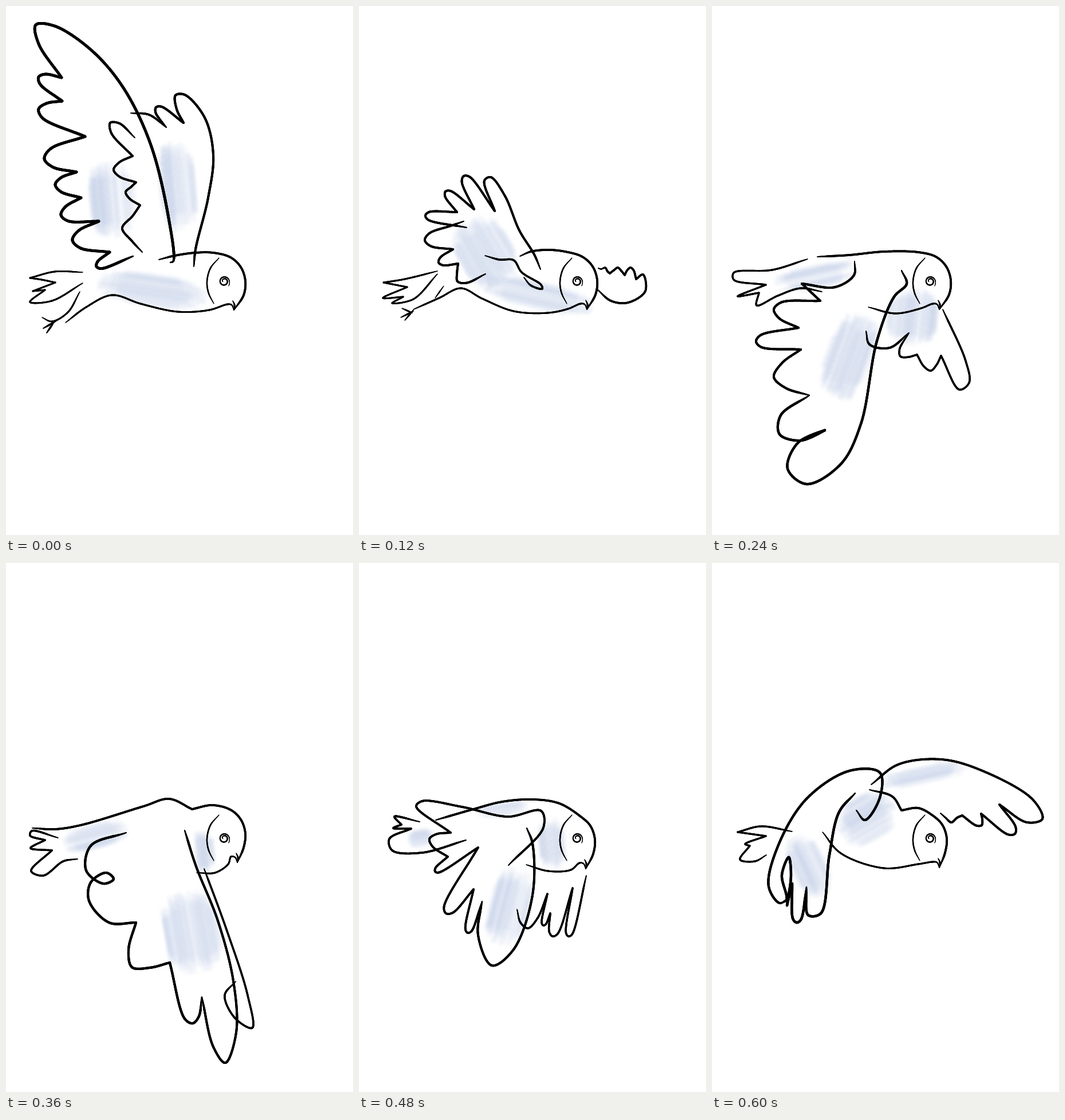
Write an HTML page with a canvas that moves like this. It is 606 by 924 pixels and loops after 720 ms.

```html
<!DOCTYPE html>
<html lang="en">
<head>
<meta charset="utf-8">
<title>Bird in flight</title>
<style>
  html, body { margin: 0; width: 100%; height: 100%; overflow: hidden; background: #fff; }
  canvas { position: absolute; left: 0; top: 0; width: 606px; height: 924px; opacity: 0; }
</style>
</head>
<body>
<script>
const W = 606, H = 924, HOLD = 120, COUNT = 6;
const dpr = window.devicePixelRatio || 1;
let ctx, seed = 7, index = 0;

const rand = (lo = 0, hi = 1) => lo + (hi - lo) * (seed = (seed * 16807) % 2147483647) / 2147483647;
const parse = s => s.trim().split(/\s+/).map(p => p.split(',').map(Number));
const gap = (a, b) => Math.hypot(a[0] - b[0], a[1] - b[1]);
const mirror = (a, b) => [2 * a[0] - b[0], 2 * a[1] - b[1]];
const mix = (a, b, t0, t1, t) => a.map((v, k) => (v * (t1 - t) + b[k] * (t - t0)) / (t1 - t0));

// Centripetal Catmull-Rom curve, sampled about every pixel
function spline(pts) {
  const n = pts.length, out = [];
  const at = i => i < 0 ? mirror(pts[0], pts[1]) : i >= n ? mirror(pts[n - 1], pts[n - 2]) : pts[i];
  for (let i = 0; i < n - 1; i++) {
    const [a, b, c, d] = [at(i - 1), at(i), at(i + 1), at(i + 2)];
    const t1 = Math.sqrt(gap(a, b)), t2 = t1 + Math.sqrt(gap(b, c)), t3 = t2 + Math.sqrt(gap(c, d));
    const steps = Math.ceil(gap(b, c));
    for (let k = 0; k <= steps; k++) {
      const t = t1 + (t2 - t1) * k / steps;
      const ab = mix(a, b, 0, t1, t), bc = mix(b, c, t1, t2, t), cd = mix(c, d, t2, t3, t);
      out.push(mix(mix(ab, bc, 0, t2, t), mix(bc, cd, t1, t3, t), t1, t2, t));
    }
  }
  return out;
}

// Pen line with thinner ends
function trace(pts, width) {
  const last = pts.length - 1, taper = Math.min(22, last / 2);
  for (let i = 0; i < last; i++) {
    ctx.lineWidth = width * (0.5 + 0.5 * Math.min(1, i / taper, (last - i) / taper));
    ctx.beginPath();
    ctx.moveTo(...pts[i]);
    ctx.lineTo(...pts[i + 1]);
    ctx.stroke();
  }
}

// Rounded feather from one notch to the next; its width follows the notch spacing
function feather(from, tip, to) {
  const mid = mix(from, to, 0, 2, 1), len = gap(mid, tip);
  const ux = (tip[0] - mid[0]) / len, uy = (tip[1] - mid[1]) / len;
  const r = 0.27 * ((from[0] - to[0]) * uy + (to[1] - from[1]) * ux);
  const back = 0.8 * Math.abs(r);
  const side = k => [tip[0] - k * r * uy - back * ux, tip[1] + k * r * ux - back * uy];
  return spline([from, side(-1), tip, side(1), to]);
}

// Smooth line (a slash is a sharp corner), then a row of feathers: tip, notch, tip, notch...
function pen(width, edge, tips) {
  let prev, all = [];
  for (const part of edge.split('/')) {
    const pts = parse(part);
    all = all.concat(spline(prev ? [prev, ...pts] : pts));
    prev = pts[pts.length - 1];
  }
  const row = tips ? parse(tips) : [];
  for (let i = 0; i < row.length; i += 2) {
    all = all.concat(feather(prev, row[i], row[i + 1]));
    prev = row[i + 1];
  }
  trace(all, width);
}

function eye(x, y) {
  const pts = [];
  for (let t = 0; t <= 1; t += 0.01) {
    const a = 0.9 - (1 - t) * 10.5, d = 2 + 6.5 * Math.sqrt(t) + 3 * t ** 12;
    pts.push([x + d * Math.cos(a), y + d * Math.sin(a)]);
  }
  trace(pts, 2.2);
}

// Back, head, beak and belly; the head hangs on the beak tip
function body(right, x, y, back, belly) {
  const shift = (...pts) => pts.map(([dx, dy]) => `${x + dx},${y + dy}`).join(' ');
  const far = right - x;
  pen(3.7, back + ' ' + shift([far - 26, -92], [far - 8, -75], [far, -51], [far - 3, -26], [0, 0]));
  pen(3, belly + ' ' + shift([-11, -10], [-4, -9], [0, 0]));
  pen(3, shift([-2, -16], [1, -9], [0, 0]));
  pen(2.4, '372,440 357,458 351,482 354,502 363,520');
  eye(381, 481);
}

// Soft brush patch: seeded bristles laid side by side along one direction
function wash(x, y, length, width, degrees) {
  ctx.save();
  ctx.translate(x, y);
  ctx.rotate(degrees * Math.PI / 180);
  ctx.lineCap = 'butt';
  ctx.filter = 'blur(2px)';
  ctx.strokeStyle = 'rgba(180,194,219,.075)';
  for (let i = 0; i < width * 1.1; i++) {
    const v = rand(-1, 1), reach = length / 2 * Math.sqrt(1 - 0.8 * v ** 4);
    ctx.lineWidth = rand(4, 13);
    ctx.beginPath();
    ctx.moveTo(-reach * rand(0.6, 1.1), v * width / 2);
    ctx.lineTo(reach * rand(0.6, 1.1), v * width / 2);
    ctx.stroke();
  }
  ctx.restore();
}

// Each pose is one drawing, shown for its share of the loop
function pose(draw) {
  const c = document.body.appendChild(document.createElement('canvas'));
  c.width = W * dpr;
  c.height = H * dpr;
  ctx = c.getContext('2d');
  ctx.scale(dpr, dpr);
  ctx.lineCap = ctx.lineJoin = 'round';
  draw();
  const cut = 1 / COUNT, loop = HOLD * COUNT;
  c.animate([
    { opacity: 1, offset: 0 }, { opacity: 1, offset: cut },
    { opacity: 0, offset: cut }, { opacity: 0, offset: 1 }
  ], { duration: loop, iterations: Infinity, delay: index++ * HOLD - loop });
}

// Wings raised
pose(() => {
  wash(185, 338, 125, 75, 85);
  wash(300, 315, 150, 62, 85);
  wash(255, 497, 180, 52, 8);
  pen(4.8, '287,448 292,446 283,365 252,240 205,143 150,78 85,35 52,33 57,66 97,125',
    '57,124 98,166 57,180 138,228 67,267 123,290 86,312 131,335 96,365 162,376 116,409 181,430 158,455 222,437');
  pen(4, '328,455 331,425 353,335 362,260 347,195 312,155 296,156 298,180 310,204', '262,177 280,212');
  pen(3.6, '280,212 250,190 218,187');
  pen(3.8, '225,230 198,205 182,204 184,222 221,262', '188,286 227,308 209,325 234,348 203,388 238,430');
  body(418, 398, 531, '267,443 295,436 330,431 362,431', '104,553 140,526 185,505 235,520 300,534 355,531');
  pen(2.9, '134,465 85,464 42,475 / 62,478 86,483 / 47,498 / 68,496 / 42,517 80,515 134,484');
  pen(2.9, '129,499 108,535 80,551 63,544');
  pen(3.4, '88,550 65,563');
  pen(3.4, '84,552 71,571');
});

// Wings folding down
pose(() => {
  wash(220, 430, 120, 90, 60);
  wash(310, 505, 190, 42, 13);
  pen(3.8, '317,460 306,434 280,392 255,332 230,299 219,305 237,358', '183,297 201,355 151,324 171,360 116,366 188,387');
  pen(3.8, '183,376 160,384', '115,409 164,425 139,448 173,450 172,481 221,468');
  pen(3.4, '220,436 245,443 270,444 284,465 318,487 320,494 300,488 288,474');
  body(416, 398, 530, '281,437 300,429 330,426 360,429', '95,530 140,510 178,493 215,511 270,533 330,536 365,529');
  pen(2.4, '148,489 133,510');
  pen(2.9, '137,463 80,477 43,483 / 84,491 / 42,510 77,508 / 58,519 95,512 137,468');
  pen(3, '75,528 93,536');
  pen(3, '73,544 95,533');
  pen(3, '80,549 95,531');
  pen(3.6, '415,494 440,515 470,518 500,498 496,469 484,477', '474,457 464,470 452,457 438,467 430,457 418,458');
});

// Downstroke
pose(() => {
  wash(180, 473, 140, 36, -12);
  wash(240, 612, 145, 75, 110);
  wash(350, 543, 95, 85, 95);
  body(417, 397, 530, '184,438 240,435 300,429 360,430', '273,526 320,537 365,528');
  pen(3.2, '167,442 105,461 38,466 38,478 94,487 / 45,507 82,501 / 78,523 115,506 155,493 192,499');
  pen(4, '249,446 248,470 215,491 157,485 / 189,515', '108,530 151,562 77,586 155,600 108,648 170,680');
  pen(4.3, '170,680 120,715 118,748 155,759 197,741 150,763 132,808 165,835 225,800 260,730 288,585 318,508 340,485 331,462');
  pen(3.4, '403,530 443,620 449,658 432,670 400,611', '382,637 358,609 329,612 344,571');
  pen(3.8, '344,571 310,597 275,591 269,568');
});

// Wings fully lowered
pose(() => {
  wash(155, 477, 110, 38, -14);
  wash(345, 505, 75, 32, 85);
  wash(325, 645, 135, 95, 80);
  body(418, 404, 523, '46,463 85,465 130,458 240,425 285,412 325,430 / 360,423', '333,541 365,541 388,526');
  pen(3.4, '91,480 45,468 42,476 68,484 / 43,498 80,502 / 44,538 65,546 100,521 125,517');
  pen(4.2, '210,471 148,494 140,537 170,560 188,552 175,541 148,558 145,590 180,628 227,628', '220,706 286,698 326,804 342,758');
  pen(4, '342,758 362,845 383,873 402,820 397,730 370,625 332,530 312,467');
  pen(3.4, '346,534 385,640 422,755 430,812 400,795 382,755 401,731');
});

// Wings drawing in
pose(() => {
  wash(250, 430, 90, 20, -8);
  wash(337, 490, 85, 42, 85);
  wash(262, 600, 130, 65, 105);
  wash(108, 482, 45, 28, -10);
  body(412, 396, 534, '134,449 200,430 250,417 305,413 350,420', '292,527 330,538 370,536');
  pen(3.6, '106,452 62,443 74,457 / 60,463 91,464 / 53,482 58,502 110,506 187,484');
  pen(3.7, '261,528 322,462 318,433 260,443 180,426 110,416 100,425 160,471',
    '123,482 155,513 133,539 208,497 152,612 200,570 190,646 215,591');
  pen(4, '215,591 208,650 232,703 270,675 303,580 303,490 293,463');
  pen(3.4, '276,605 282,628 295,638 312,620 329,578', '322,633 334,612 338,652 373,568 366,652 397,546');
});

// Upstroke
pose(() => {
  wash(370, 370, 140, 28, -12);
  wash(270, 448, 100, 75, -30);
  wash(168, 530, 110, 55, 65);
  pen(3.8, '278,387 325,352 400,343 470,362 560,413 577,447 550,453 502,422', '529,473 470,438 471,458 437,441 418,453 399,437');
  pen(4.2, '252,432 267,449 293,410 293,366 240,363 165,412 115,495 99,565 118,594 130,588');
  pen(4.4, '120,595 130,588 122,545 134,514 138,545 131,598 / 140,560', '148,628 165,566');
  pen(4.4, '165,566 168,615 190,612 205,510 222,435 250,402');
  body(410, 397, 532, '275,396 315,408 331,432 / 360,428', '193,470 225,507 300,533 360,526');
  pen(3.2, '140,469 85,460 45,470 / 94,477 / 58,491 66,494 / 49,518 75,521 95,510');
});
</script>
</body>
</html>
```
